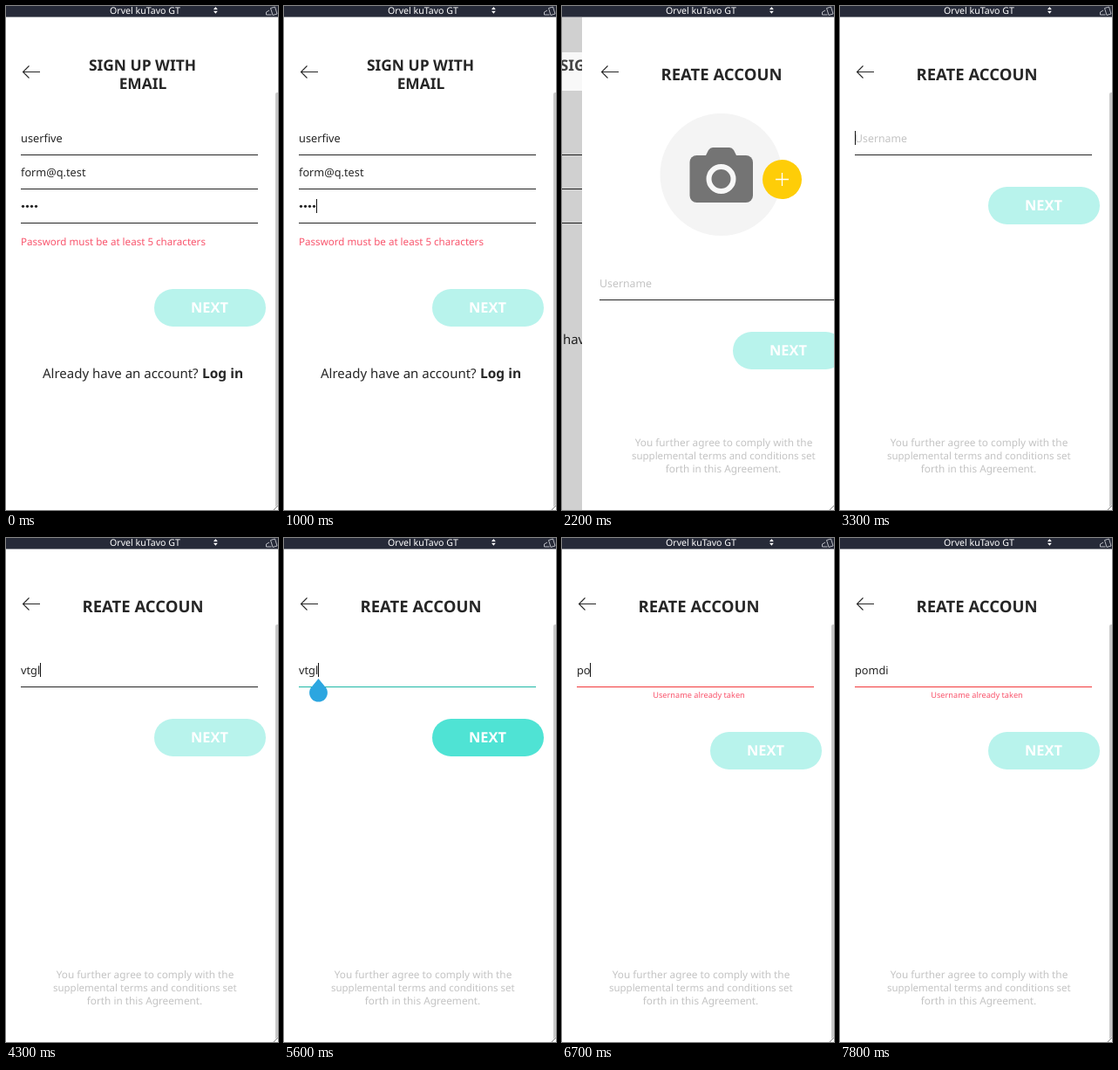
Write an HTML page that moves like this. It is 312 px wide and 577 px high and loops after 8 s.

```html
<!DOCTYPE html>
<html lang="en">
<head>
<meta charset="utf-8">
<title>Sign up flow</title>
<style>
html, body { margin: 0; width: 100%; height: 100%; overflow: hidden; background: #fff; }
svg { display: block; width: 312px; height: 577px; }
text { font-family: "Noto Sans", "Open Sans", sans-serif; text-rendering: geometricPrecision; }
</style>
</head>
<body>
<svg id="stage" viewBox="0 0 312 577"></svg>
<script>
const LOOP = 8000;
const INK = '#262626', GREY = '#c4c4c4', PINK = '#f9546c', RED = '#f2393b', TEAL = '#1fb8a6';
const OFF = '#b8f3ec', MID = '#84ebe0', ON = '#4fe3d4', PRESSED = '#48cfc1';
const FIELD = 12.75;

// Each step changes only the listed properties; the rest carries over.
const steps = [
  [0, { page: 'email', slide: null, dots: 4, caret: 0, error: true, button: OFF }],
  [200, { dots: 0, caret: 17 }],
  [400, { dots: 6, caret: 47 }],
  [500, { dots: 1, caret: 22 }],
  [700, { dots: 2, caret: 27 }],
  [900, { dots: 3, caret: 32 }],
  [1000, { dots: 4, caret: 37 }],
  [1100, { dots: 5, caret: 42, error: false }],
  [1200, { dots: 6, caret: 47, button: MID }],
  [1300, { button: ON }],
  [1700, { button: PRESSED }],
  [1800, { button: ON }],
  [2000, { slide: 230, caret: 0 }],
  [2100, { slide: 90 }],
  [2200, { slide: 26 }],
  [2300, { slide: 8 }],
  [2400, { slide: 2 }],
  [2500, { page: 'name', slide: null, focus: false, name: '', notice: '', line: INK, handle: false, button: OFF }],
  [3300, { focus: true, caret: 17 }],
  [3700, { name: 'v', caret: 23, notice: 'short' }],
  [3800, { name: 'vt', caret: 28 }],
  [3900, { name: 'vtg', caret: 36 }],
  [4000, { name: 'vtgl', caret: 39 }],
  [4300, { notice: '' }],
  [4400, { button: MID }],
  [4500, { button: ON }],
  [4700, { caret: 0 }],
  [5000, { focus: false, line: TEAL }],
  [5600, { focus: true, caret: 39, handle: true }],
  [5700, { name: 'vtg', caret: 36, handle: false }],
  [5800, { name: 'vt', caret: 28 }],
  [5900, { name: 'v', caret: 23 }],
  [6000, { name: '', caret: 17 }],
  [6200, { notice: 'taken', line: RED }],
  [6300, { button: MID }],
  [6400, { button: OFF }],
  [6500, { caret: 0 }],
  [6600, { name: 'p', caret: 25 }],
  [6700, { name: 'po', caret: 32 }],
  [6900, { name: 'pom', caret: 43, notice: 'short' }],
  [7100, { name: 'pomd', caret: 51 }],
  [7300, { name: 'pomdi', caret: 54 }],
  [7600, { notice: 'taken' }],
  [7800, { caret: 0 }]
];
let carried = {};
const states = steps.map(([time, change]) => ({ time, ...(carried = { ...carried, ...change }) }));

const text = (x, y, size, fill, words, extra = '') =>
  `<text x="${x}" y="${y}" font-size="${size}" fill="${fill}" ${extra}>${words}</text>`;
const centred = (x, y, size, fill, words, extra = '') =>
  text(x, y, size, fill, words, `text-anchor="middle" ${extra}`);
const rect = (x, y, w, h, fill, rx = 0) =>
  `<rect x="${x}" y="${y}" width="${w}" height="${h}" fill="${fill}" rx="${rx}"/>`;
const circle = (x, y, r, fill) => `<circle cx="${x}" cy="${y}" r="${r}" fill="${fill}"/>`;
const stroke = (d, color, width = 1) =>
  `<path d="${d}" fill="none" stroke="${color}" stroke-width="${width}"/>`;
const shifted = (x, content) => `<g transform="translate(${x} 0)">${content}</g>`;
const BOLD = 'font-weight="700"';

const underline = (y, color = INK) => rect(17, y, 272, 1, color);
const caretAt = (x, y) => x ? rect(x, y, 1, 16, '#111') : '';
const backArrow = () => stroke('M39 75.5H20M26.5 68.5l-7 7 7 7', INK, 1.1);
const nextButton = (top, fill) =>
  rect(170, top, 128, 43, fill, 21.5) + centred(233.5, top + 27, 16.4, '#fff', 'NEXT', BOLD);
const emailTitle = color =>
  centred(156.5, 74, 17.4, color, 'SIGN UP WITH', BOLD) + centred(157, 95, 17.4, color, 'EMAIL', BOLD);

function emailPage(s) {
  const top = s.error ? 324 : 285;
  let dots = '';
  for (let i = 0; i < s.dots; i++) dots += circle(19.5 + 5 * i, 229.3, 1.6, '#222');
  return emailTitle(INK)
    + backArrow()
    + text(17, 156, FIELD, INK, 'userfive') + underline(170)
    + text(17, 195, FIELD, INK, 'form@q.test') + underline(209)
    + dots + caretAt(s.caret, 221) + underline(248)
    + (s.error ? text(17, 274, 11.6, PINK, 'Password must be at least 5 characters') : '')
    + nextButton(top, s.button)
    + text(42, top + 102, 15, INK, 'Already have an account?')
    + text(225, top + 102, 15.5, INK, 'Log in', BOLD);
}

function photo() {
  return circle(156.5, 193, 70, '#f4f4f4')
    + '<path d="M139 171l3-6q2-3 5-3h19q3 0 5 3l3 6z" fill="#747474"/>'
    + rect(120.5, 171, 72.5, 54, '#747474', 8)
    + '<circle cx="156.5" cy="198" r="14" fill="none" stroke="#f7f7f7" stroke-width="6"/>'
    + circle(226.5, 198.5, 22.5, '#fecd08')
    + stroke('M219 198.5h15M226.5 191v15', '#fff', 1.3);
}

function namePage(s) {
  const base = s.focus ? 170 : 336;
  const push = { short: 39, taken: 15 }[s.notice] || 0;
  return centred(157, 85, 18.5, INK, 'REATE ACCOUN', BOLD)
    + backArrow()
    + (s.focus ? '' : photo())
    + (s.name ? text(17, base - 14, FIELD, INK, s.name)
              : text(17, base - 14, 12.35, GREY, 'Username'))
    + underline(base, s.line)
    + (s.focus ? caretAt(s.caret, 143) : '')
    + (s.handle ? '<path d="M39.5 161l7 8.5a10.4 10.4 0 1 1-14 0z" fill="#2ca6e0"/>' : '')
    + (s.notice === 'short' ? text(17, 196, 11.6, PINK, 'Username must be at least 3 characters') : '')
    + (s.notice === 'taken' ? centred(157, 183, 9.2, PINK, 'Username already taken') : '')
    + nextButton(base + 37 + push, s.button)
    + centred(159.5, 504, 11.8, GREY, 'You further agree to comply with the')
    + centred(159.3, 519, 11.5, GREY, 'supplemental terms and conditions set')
    + centred(159, 534, 11.8, GREY, 'forth in this Agreement.');
}

function sliding(s) {
  const progress = 1 - s.slide / 312;
  const fresh = { name: '', notice: '', line: INK, button: OFF };
  const edge = Math.max(0, s.slide - 3);
  const dim = `<rect y="13" width="312" height="564" fill="#000" opacity="${0.2 * progress}"/>`;
  return shifted(-107 * progress, emailPage(s)) + dim
    + rect(0, 53, 312, 44, '#f8f8f8') + shifted(-106 * progress, emailTitle('#444'))
    + rect(edge, 13, 312, 564, '#fff') + shifted(s.slide, namePage(fresh));
}

function titleBar() {
  return rect(0, 0, 312, 12.6, '#262a38')
    + text(119, 9, 10.6, '#fff', 'Orvel kuTavo GT')
    + '<path d="M238 4l2.4-3 2.4 3zM238 5.8l2.4 3 2.4-3z" fill="#fff"/>'
    + stroke('M303.5 2.5l5-1.5 2.5 8-5 1.5zM302 5l-3.5 2v3h6', '#c9cbd2', 0.9);
}

function scene(s) {
  const moving = s.slide !== null;
  const page = moving ? sliding(s) : s.page === 'email' ? emailPage(s) : namePage(s);
  return rect(0, 0, 312, 577, '#fff') + page
    + (moving ? '' : rect(309, 99, 6, 485, '#c8c8c8', 2))
    + '<path d="M306 577l6-6v6z" fill="#fff"/>' + stroke('M307 577l5-5', '#888')
    + titleBar();
}

const stage = document.getElementById('stage');
const start = performance.now();
let shown;
function tick() {
  const time = Math.max(0, performance.now() - start) % LOOP;
  const state = states.findLast(s => s.time <= time);
  if (state !== shown) stage.innerHTML = scene(shown = state);
  requestAnimationFrame(tick);
}
tick();
</script>
</body>
</html>
```
